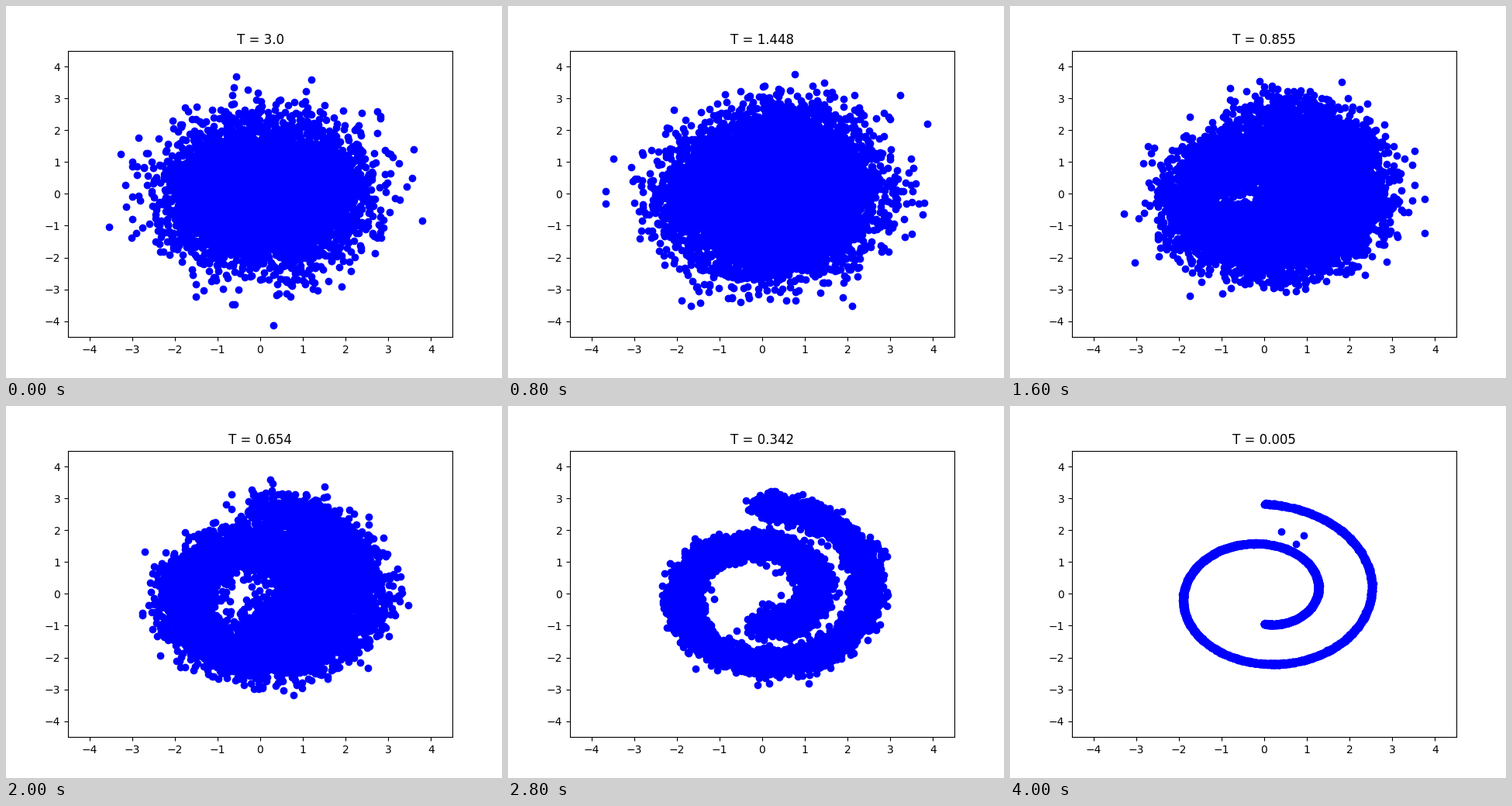
A matplotlib script for the animation above (4.1 s loop, 640x480 px).

```python
import numpy as np
import matplotlib.pyplot as plt
from matplotlib.animation import FuncAnimation

FRAMES = 41
STEPS = 200
T_MAX = 3.0
POINTS = 7000

rng = np.random.default_rng(12)


def time_at(frame):
    """Diffusion time, evenly spaced in exp(-t), five steps per frame."""
    step = max(5 * frame - 1, 0)
    low = np.exp(-T_MAX)
    return -np.log(low + (1 - low) * step / STEPS)


def decay(t):
    """Integrated noise rate up to time t."""
    return t ** 2 / T_MAX


def swiss_roll(n):
    angle = 1.5 * np.pi * (1 + 2 * rng.random(n))
    roll = np.column_stack([angle * np.cos(angle), angle * np.sin(angle)]) / 5
    return roll + rng.normal(0, 0.01, roll.shape)


def diffuse(points):
    """Noise the points step by step; played backwards, the cloud condenses."""
    clouds = [None] * FRAMES
    previous = 0.0
    for frame in reversed(range(FRAMES)):
        level = decay(time_at(frame))
        keep = np.exp(-(level - previous) / 2)
        noise = rng.standard_normal(points.shape)
        points = keep * points + np.sqrt(1 - keep ** 2) * noise
        clouds[frame] = points
        previous = level
    clouds[0] = clouds[0] / clouds[0].std(axis=0)
    return clouds


strays = [(0.40, 1.95), (0.75, 1.57), (0.93, 1.83)]
clouds = diffuse(np.vstack([swiss_roll(POINTS), strays]))

fig, ax = plt.subplots(figsize=(6.4, 4.8), dpi=100)
ax.set_xlim(-4.5, 4.5)
ax.set_ylim(-4.5, 4.5)
dots, = ax.plot([], [], "o", color="blue")
title = ax.set_title("")


def draw(frame):
    dots.set_data(*clouds[frame].T)
    title.set_text(f"T = {round(float(time_at(frame)), 3)}")
    return dots, title


anim = FuncAnimation(fig, draw, frames=FRAMES, interval=100,
                     repeat=True, repeat_delay=0, blit=False)
plt.show()
```
